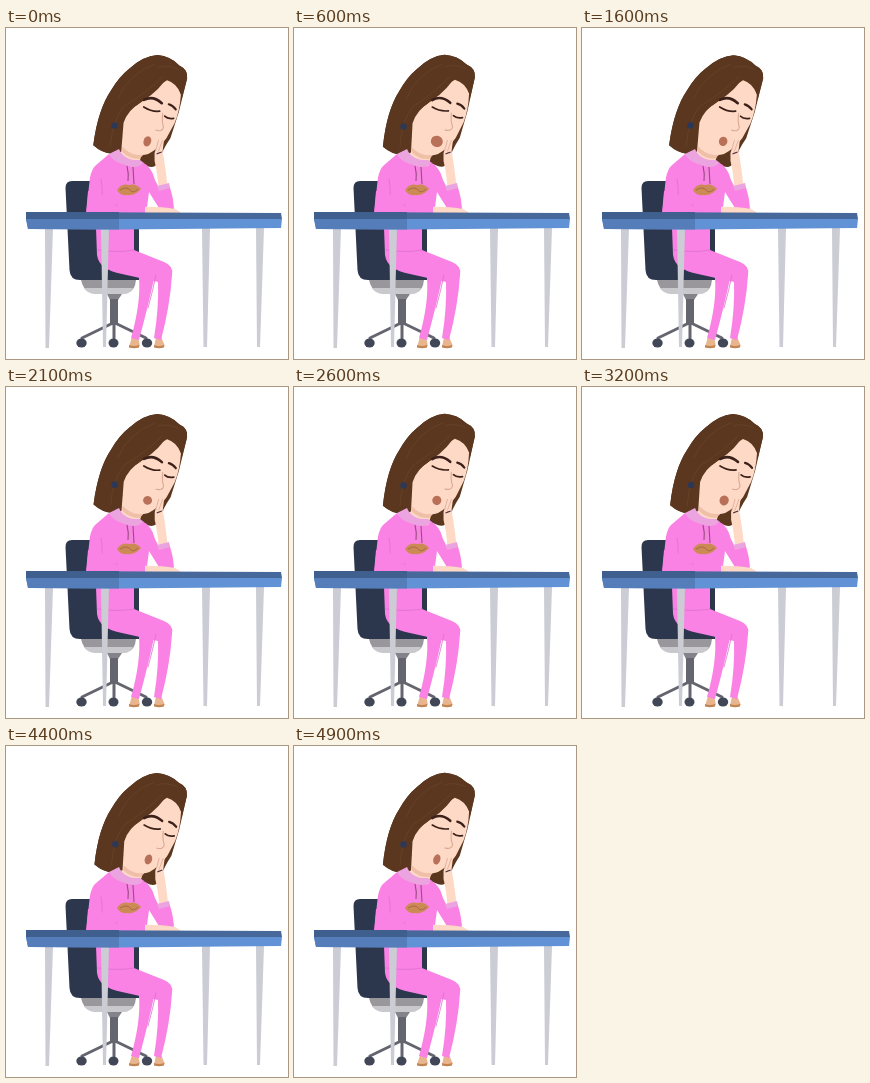
Animation, 282 px wide and 331 px high, one loop 5000 ms. Source, as an HTML page:

```html
<!DOCTYPE html>
<html lang="en">
<head>
<meta charset="utf-8">
<title>Tired at the desk</title>
<style>
html, body { margin: 0; width: 100%; height: 100%; overflow: hidden; background: #fff; }
svg { display: block; width: 100vw; height: 100vh; }
.skin { fill: #fdd9c6; }
.pink { fill: #f982e4; }
.hood { fill: #eba4df; }
.hair { fill: #5b371f; }
.fold { fill: none; stroke: #df70cb; stroke-width: .8; stroke-linecap: round; }
.ink { fill: none; stroke: #3b211a; stroke-linecap: round; }
.metal { fill: #cbccd4; }
</style>
</head>
<body>
<svg viewBox="0 0 282 331">
  <g id="chair">
    <path fill="#2c374d" d="M59.500 160Q59.500 153 66 153H94V184H133V252H74Q64 252 63.500 242Z"/>
    <path fill="#99979c" d="M75 252H130Q129 262 123 264H83Q77 261 75 252Z"/>
    <path fill="#c9c8cc" d="M78 260H127Q124 266 118 266H88Q81 265 78 260Z"/>
    <path fill="#85838a" d="M101 266H116L112 272H104Z"/>
    <path fill="#656570" d="M104 271H112V297H104Z"/>
    <path fill="none" stroke="#656570" stroke-width="3" stroke-linecap="round" d="M107 295L76 310M109 295L140 310M108 295V310"/>
    <g fill="#414757">
      <ellipse cx="75.500" cy="315" rx="5.200" ry="4.500"/>
      <ellipse cx="107.500" cy="315" rx="5" ry="4.500"/>
      <ellipse cx="141" cy="315" rx="5.200" ry="4.500"/>
    </g>
  </g>

  <g id="legs">
    <path fill="#e9b58e" d="M126 309H132L134 318Q130 321 123 319ZM150 309H155L159 318Q154 321 148 319Z"/>
    <path fill="#c08553" d="M123 317Q128 319 133 317V319.500Q128 321 123 319.500ZM148 317Q153 319 158 317V319.500Q153 321 148 319.500Z"/>
    <path class="pink" d="M128 240L149 246Q143 275 133 312L125 310Q135 275 133 250Z"/>
    <path class="pink" d="M90 200H128V222L158 234Q168 238 166 247Q164 278 155 312L148 310Q153 280 152 254L116 246Q93 242 91 227Z"/>
    <path class="fold" d="M92 222Q112 225 128 222M150 247Q147 262 142 280"/>
  </g>

  <g id="torso">
    <path class="pink" d="M103 126Q118 140 135 133L146 144Q150 154 143 164L140 187H80L83 158Q84 143 89 138Z"/>
    <path class="fold" d="M95 151Q98 167 94 184M111 176Q108 181 104 184"/>
  </g>

  <g id="head">
    <path class="hair" d="M88 118C91 93 97 75 105 63Q113 49 123 41Q137 28 151 27Q164 28 173 37Q182 41 181 50L173 84L165 110Q157 122 153 134Q149 142 140 137L116 126Q102 129 88 118Z"/>
    <path class="skin" d="M115 108L114 127Q121 138 133 138L138 122Z"/>
    <path fill="#f0bfa8" d="M117 119Q128 130 139 126L134 131Q123 131 117 124Z"/>
    <path class="skin" d="M161 52Q171 55 175 66Q174 83 169 95L161 110Q154 120 143 126Q134 129 127 124Q118 118 116 106Q115 91 124 82Q139 73 153 57Z"/>
    <path class="hair" d="M162 47Q155 61 137 73Q122 82 118 95L116 124Q101 130 88 118C91 93 97 75 105 63Q113 49 123 41Q137 28 151 27Q164 28 173 37Q182 41 181 50L176 70Q174 57 165 52Z"/>
    <path fill="none" stroke="#6a4429" stroke-width=".8" d="M157 48Q139 66 119 78Q107 91 105 119M149 36Q122 46 112 71M172 41Q161 36 151 39"/>
    <path class="ink" stroke-width="2.600" d="M138 72Q147 67 156 75"/>
    <path class="ink" stroke-width="2.200" d="M163 76Q167 77 170 81"/>
    <path class="ink" stroke-width="1.700" d="M138 79Q146 84 154 83M159 88Q162 91 168 90"/>
    <path fill="none" stroke="#dba993" stroke-width="1.100" d="M157 85Q156 94 158 99Q157 104 150 102"/>
    <circle cx="109" cy="98" r="3.200" fill="#2b3858"/>
    <ellipse id="mouth" cx="142" cy="113.400" fill="#b87058" transform="rotate(18 142 113.400)"/>
  </g>

  <g id="collar">
    <path class="hood" d="M103 126L113 121Q118 133 134 132L138 135Q130 142 119 137Q107 134 103 126Z"/>
    <path fill="none" stroke="#94507a" stroke-width="1.100" d="M121 138Q123 146 122 153M127 139L128 156"/>
    <path fill="#cc8a55" d="M111 162Q116 155 123 157Q130 155 135 161Q129 168 121 167Q114 168 111 162Z"/>
    <path fill="none" stroke="#9c6345" stroke-width=".8" d="M114 162Q121 158 124 162T132 161"/>
  </g>

  <g id="arm">
    <g id="hand">
      <path class="skin" d="M149 125L153 112Q155 106 159 108L157 123Q160 139 162 159L153 161Q152 145 149 133Z"/>
      <path fill="none" stroke="#dda996" stroke-width=".8" d="M153 112L150 123M157 112L153 123M158 123Q155 126 152 124"/>
      <path fill="none" stroke="#4a3140" stroke-width="1.300" d="M151 126L156 124"/>
    </g>
    <path class="pink" d="M136 134Q145 138 149 152L153 160L163 157Q168 170 168 185H156L143 164Z"/>
    <path class="hood" d="M151 158L163 155L164 160L153 163Z"/>
    <path class="skin" d="M110 180Q149 177 169 181L174 184V186H110Z"/>
    <path class="pink" d="M82 163L95 165L106 178L139 177V186H80Z"/>
  </g>

  <g id="desk">
    <path class="metal" d="M39 200H47L43 320H39.500ZM95 200H103L100 319H97ZM196 200H204L201 319H197.500ZM250 200H258L254 319H251Z"/>
    <path fill="#46689b" d="M20 184L275 185L276 191H20Z"/>
    <path fill="#6292d6" d="M20 191H276L275 200L113 201.500L22 201Z"/>
    <path fill="#3f608f" d="M20 184H113V191H20Z"/>
    <path fill="#547dba" d="M20 191H113V201.500L22 201Z"/>
  </g>
</svg>
<script>
const LOOP = 5000, STEP = 100, NOD = 2000, PEAK = 750;
const el = id => document.getElementById(id);

// time, half width, half height
const yawn = [
  [0, 3.8, 5.2], [600, 6, 5.6], [1200, 4, 4.8], [2100, 4.5, 4.4],
  [3200, 4.6, 5], [4000, 3.8, 5], [4900, 3.5, 5.2]
];

function mouthSize(t) {
  const i = Math.max(1, yawn.findIndex(key => key[0] >= t));
  const a = yawn[i - 1], b = yawn[i];
  const p = (t - a[0]) / (b[0] - a[0]);
  return a.map((v, n) => v + (b[n] - v) * p).slice(1);
}

function draw(now) {
  const t = Math.floor(now % LOOP / STEP) * STEP;
  const nod = Math.cos((t - PEAK) / NOD * 2 * Math.PI);
  // The head tips around its middle: crown to the left, chin to the right.
  el('head').setAttribute('transform', `rotate(${-nod} 142 60)`);
  el('hand').setAttribute('transform', `translate(${nod * .6} 0)`);
  const [rx, ry] = mouthSize(t);
  el('mouth').setAttribute('rx', rx);
  el('mouth').setAttribute('ry', ry);
}

const start = performance.now();
function tick() {
  draw(performance.now() - start);
  requestAnimationFrame(tick);
}
tick();
</script>
</body>
</html>
```
